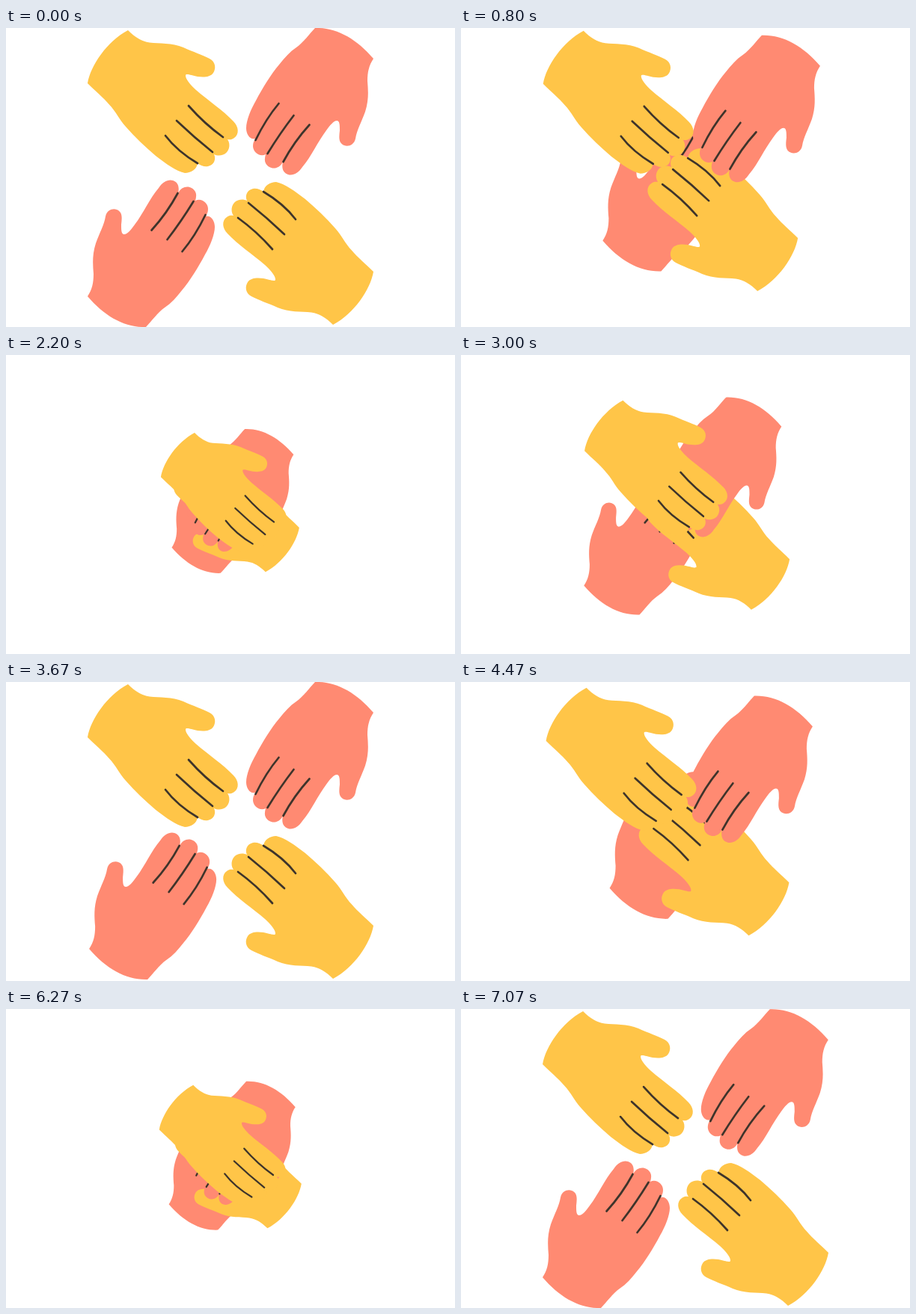
An HTML page with a canvas for the animation above (7110 ms loop, 600 px wide and 400 px high).

```html
<!DOCTYPE html>
<html lang="en">
<head>
<meta charset="utf-8">
<title>Hands together</title>
<style>
html, body { margin: 0; width: 100%; height: 100%; overflow: hidden; background: #fff; }
canvas { display: block; width: 600px; height: 400px; }
</style>
</head>
<body>
<canvas id="stage"></canvas>
<script>
const canvas = document.getElementById('stage');
const ctx = canvas.getContext('2d');
const ratio = window.devicePixelRatio || 1;
canvas.width = 600 * ratio;
canvas.height = 400 * ratio;

const LOOP = 7110;
const CYCLE = 3567; // the second round is cut slightly short by the loop
const REACH = 1100;
const CLOSED = 0.835;
const INK = '#3e342b';

const yellow = {
  fill: '#ffc548',
  shape: new Path2D(`M163 3 C172 12 181 18 192 19.5 C205 21 222 19.5 237 26
    C250 32 263 36 272 41 C280 45 281 54 277 60 C273 66 264 66 256 65
    C248 63.5 241 60.5 240 63 C239.5 68 246 75.5 254 83 C270 97 290 110 304 125
    C311 132 312 142 305 147 C302 149.5 299 149.5 296 149
    C301 156 298 167 290 169.5 C286 171 282 171 278 169
    C281 176 278 183 270 185 C265 186 260 184 256 181
    C255 189 247 194 239 194 C228 192 213 181 200 171
    C186 159 172 146 160 132 C151 122 147 112 138 102.5
    C130 93 120 85 109 74 C113 50 135 18 163 3Z`),
  lines: new Path2D('M244 104 Q265 128 290 146 M228 124 Q251 146 276 166 M213 144 Q229 165 256 181')
};

const coral = {
  fill: '#ff8a72',
  shape: new Path2D(`M413 0 C441 -1 468 14 491 41 C485 50 483 59 483 71
    C484 84 485 96 480 112 C475 126 469 136 467 148
    C465 157 457 159 452 157 C444 154 445 146 446 137
    C446 130 446 124 442 124 C438 124 433 130 428 137
    C416 153 408 172 396 186 C391 194 383 198 377 196
    C370 194 368 187 370 179 C365 190 352 190 347 181
    C345 177 346 173 347 169 C339 173 330 166 330 158
    C330 154 331 152 333 148 C326 150 321 142 321 134
    C321 124 327 109 334 97 C343 80 354 62 365 49
    C372 40 379 32 388 26 C398 19 405 8 413 0Z`),
  lines: new Path2D('M364.5 101 Q347 122 333.5 150 M384.5 117 Q366 141 349.5 168 M405.5 129.5 Q385 152 370.5 179')
};

// Bottom to top of the pile; dx, dy is the way from rest to the pile.
const hands = [
  { art: coral, turned: true, dx: 97, dy: -90, enter: 0, leave: 2600, retreat: 800 },
  { art: yellow, turned: true, dx: -81, dy: -89, enter: 248, leave: 2604, retreat: 850 },
  { art: coral, turned: false, dx: -90, dy: 79, enter: 550, leave: 2614, retreat: 920 },
  { art: yellow, turned: false, dx: 79.5, dy: 82, enter: 733, leave: 2619, retreat: 900 }
];

function ease(time, start, length) {
  const p = Math.min(1, Math.max(0, (time - start) / length));
  return (1 - Math.cos(Math.PI * p)) / 2;
}

function drawHand(hand, time) {
  const near = ease(time, hand.enter, REACH) - ease(time, hand.leave, hand.retreat);
  ctx.save();
  ctx.translate(hand.dx * near, hand.dy * near);
  if (hand.turned) ctx.rotate(Math.PI);
  ctx.translate(-300, -200);
  ctx.fillStyle = hand.art.fill;
  ctx.fill(hand.art.shape);
  ctx.stroke(hand.art.lines);
  ctx.restore();
}

function draw(now) {
  const time = (now % LOOP) % CYCLE;
  const squeeze = ease(time, 1510, 620) - ease(time, 2634, 580);
  const size = 1 - (1 - CLOSED) * squeeze;
  ctx.setTransform(ratio, 0, 0, ratio, 0, 0);
  ctx.fillStyle = '#fff';
  ctx.fillRect(0, 0, 600, 400);
  ctx.translate(300, 200);
  ctx.scale(size, size);
  ctx.strokeStyle = INK;
  ctx.lineWidth = 2.7;
  ctx.lineCap = 'round';
  for (const hand of hands) drawHand(hand, time);
}

const begin = performance.now();
function tick() {
  draw(performance.now() - begin);
  requestAnimationFrame(tick);
}
tick();
</script>
</body>
</html>
```
